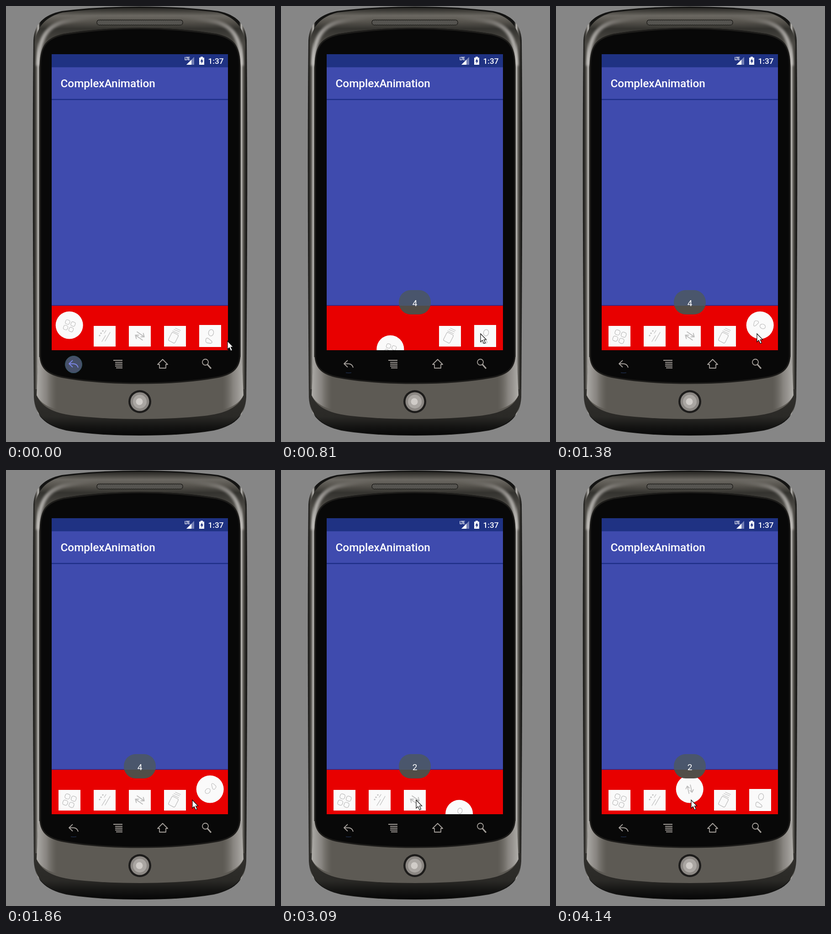
Write an HTML page that moves like this. It is 589x950 px and loops after 4170 ms.

```html
<!DOCTYPE html>
<html lang="en">
<head>
<meta charset="utf-8">
<title>Tab bar animation</title>
<style>
html, body { margin: 0; width: 100%; height: 100%; overflow: hidden; background: #868686; }
svg { display: block; width: 589px; height: 950px; }
text { font-family: Roboto, "Noto Sans", sans-serif; fill: #fff; }
.icon { fill: none; stroke: #bebebe; stroke-width: 1.3; stroke-linecap: round; stroke-linejoin: round; }
.nav { fill: none; stroke: #a39e99; stroke-width: 1.8; stroke-linejoin: round; }
</style>
</head>
<body>
<svg viewBox="0 0 589 950">
  <defs>
    <linearGradient id="side" gradientUnits="userSpaceOnUse" x1="58" x2="293" spreadMethod="reflect">
      <stop offset="0" stop-color="#121211"/><stop offset=".018" stop-color="#2b2a27"/>
      <stop offset=".034" stop-color="#55534e"/><stop offset=".046" stop-color="#8f8d89"/>
      <stop offset=".055" stop-color="#c4c2be"/><stop offset=".064" stop-color="#4a4945"/>
      <stop offset=".075" stop-color="#141413"/>
    </linearGradient>
    <linearGradient id="top" gradientUnits="userSpaceOnUse" x1="0" y1="4" x2="0" y2="118">
      <stop offset="0" stop-color="#262522"/><stop offset=".08" stop-color="#4a4843"/>
      <stop offset=".15" stop-color="#6b6862"/><stop offset=".27" stop-color="#55524c"/>
      <stop offset=".4" stop-color="#34332f"/><stop offset=".65" stop-color="#4a4843"/>
      <stop offset="1" stop-color="#4a4843" stop-opacity="0"/>
    </linearGradient>
    <linearGradient id="shine" gradientUnits="userSpaceOnUse" x1="66" x2="293" spreadMethod="reflect">
      <stop offset="0" stop-color="#c4c2be"/><stop offset=".12" stop-color="#a5a29e" stop-opacity=".85"/>
      <stop offset=".35" stop-color="#8a8782" stop-opacity=".35"/><stop offset=".6" stop-color="#77746e" stop-opacity="0"/>
    </linearGradient>
    <linearGradient id="corner" gradientUnits="userSpaceOnUse" x1="66" x2="293" spreadMethod="reflect">
      <stop offset="0" stop-color="#b0aeaa"/><stop offset=".1" stop-color="#928f8b" stop-opacity=".8"/>
      <stop offset=".2" stop-color="#77746e" stop-opacity="0"/>
    </linearGradient>
    <linearGradient id="base" x2="0" y2="1">
      <stop offset="0" stop-color="#32312e"/><stop offset=".6" stop-color="#2a2926"/>
      <stop offset=".82" stop-color="#141413"/><stop offset="1" stop-color="#070707"/>
    </linearGradient>
    <pattern id="mesh" width="4" height="4" patternUnits="userSpaceOnUse">
      <rect width="4" height="4" fill="#777570"/>
      <path d="M0 0h2v2h-2zM2 2h2v2h-2z" fill="#33322f"/>
    </pattern>
    <filter id="soft" x="-20%" y="-20%" width="140%" height="140%"><feGaussianBlur stdDeviation="2.5"/></filter>
    <clipPath id="screen"><rect x="100" y="105" width="386" height="645"/></clipPath>
    <clipPath id="above"><rect x="250" y="610" width="90" height="43"/></clipPath>
    <clipPath id="below"><rect x="250" y="653" width="90" height="30"/></clipPath>

    <g id="icon0" class="icon" transform="translate(0 1.5) rotate(20)">
      <rect x="-12.500" y="-12.500" width="10.500" height="10.500" rx="3.500"/><rect x="2" y="-12.500" width="10.500" height="10.500" rx="3.500"/>
      <rect x="-12.500" y="2" width="10.500" height="10.500" rx="3.500"/><rect x="2" y="2" width="10.500" height="10.500" rx="3.500"/>
    </g>
    <g id="icon1" class="icon">
      <path d="M-11 -1h.1M-8 -6h.1M-4 -11h.1" stroke-width="3.2"/>
      <path d="M-6 12L2 -1M1 11L12 -8M-1 -6L3 -12"/>
    </g>
    <g id="icon2" class="icon" transform="rotate(-55)">
      <path d="M-4 10V-9M-9 -3L-4 -9L0 -3M4 -10V9M9 3L4 9L0 3" stroke-width="2"/>
    </g>
    <g id="icon3" class="icon">
      <rect x="-8" y="-9" width="16" height="20" rx="3" transform="translate(-3 3) rotate(27)"/>
      <path d="M-5 -11L8 -5M-2 -14L10 -9M1 -17L12 -12"/>
    </g>
    <g id="icon4" class="icon">
      <ellipse cx="2" cy="-7" rx="5.600" ry="7" transform="rotate(12 2 -7)"/>
      <path d="M-9 6Q-6 3 -3 6L3 11Q6 15 1 16L-7 15Q-11 13 -9 6Z"/>
    </g>
  </defs>

  <path fill="url(#side)" d="M60 75C62 38 84 19 122 11Q200 1 293 1T465 11C503 19 525 38 527 75Q530 330 526 852C524 893 502 914 455 925Q390 936 293 936T132 925C85 914 63 893 61 852Q57 330 60 75Z"/>
  <path fill="url(#top)" d="M63 118V85C66 43 89 23 124 14Q200 4 293 4T463 14C498 23 521 43 524 85V118L512 128C509 80 493 68 462 61Q390 48 293 48T125 61C94 68 78 80 75 128Z"/>
  <path fill="none" stroke="url(#shine)" stroke-width="9" filter="url(#soft)" d="M71 130C72 78 83 47 125 35Q200 20 293 20T461 35C503 47 514 78 515 130"/>
  <path fill="url(#base)" d="M62 835H525V852C523 892 501 912 455 923Q390 935 293 935T132 923C85 912 64 892 62 852Z"/>
  <path id="chin" fill="#5d5a54" d="M71 765H516L520 848C508 877 477 888 435 893Q370 900 293 900T152 893C110 888 79 877 67 848Z"/>
  <path fill="url(#corner)" d="M71 765H516L520 848C508 873 477 882 435 887H152C110 882 79 873 67 848Z"/>
  <path fill="#080808" stroke="#1d1c1a" stroke-width="3" d="M75 128C76 85 91 70 126 62Q210 49 293 49T461 62C496 70 511 85 512 128V762C511 791 493 803 462 809Q390 822 293 822T125 809C94 803 76 791 75 762Z"/>
  <rect x="199" y="30.500" width="188" height="11" rx="5" fill="url(#mesh)" stroke="#22211e" stroke-width="1.500"/>
  <circle cx="293" cy="862" r="25" fill="#1d1c1b"/>
  <circle cx="293" cy="862" r="20.500" fill="#8b8783"/>
  <circle cx="293" cy="862" r="15" fill="#aaa6a2"/>
  <circle cx="292" cy="862" r="7.500" fill="#d0ccc8"/>

  <path d="M142 799Q148 800 154 799" stroke="#263a62" fill="none"/>
  <circle id="press" cx="148" cy="781" r="18.500" fill="#465069" stroke="#2e5560"/>
  <g class="nav">
    <path id="back" d="M146 772L138 779.500L146 787M138 779.500H148Q156 780 158 788"/>
    <path d="M235 772H255M239 776.500H255M239 780.500H255M239 784.500H255M241 788.500H255"/>
    <path d="M332 781L343 770L354 781H350V789H336V781Z"/>
    <circle cx="436.500" cy="776" r="6.500"/><path d="M441 781L449 790" stroke-width="3"/>
  </g>

  <g clip-path="url(#screen)">
    <rect x="100" y="105" width="386" height="645" fill="#3f4bae"/>
    <rect x="100" y="105" width="386" height="28.500" fill="#1f3283"/>
    <rect x="100" y="202.500" width="386" height="2.500" fill="#1f2f88"/>
    <text x="119.500" y="177" font-size="24.300" font-weight="500">ComplexAnimation</text>
    <text x="442.500" y="126" font-size="17.300" font-weight="500">1:37</text>
    <text x="391" y="118" font-size="8.500" font-weight="700" letter-spacing="-1">LTE</text>
    <path d="M395 128L412 111V128Z" fill="#7581b6"/><path d="M395 128L406 117V128Z" fill="#fff"/>
    <path d="M423 112.500H426V110.500H431V112.500H434V128H423Z" fill="#fff"/>
    <path d="M429.500 114L425.500 121H428V126L432 118.500H429.500Z" fill="#1f3283"/>
    <rect x="100" y="653" width="386" height="97" fill="#e80000"/>
    <path d="M100 652.500H486" stroke="#33247e" stroke-width="1.500"/>
    <g id="slots"></g>
    <g id="ball"><circle r="30" fill="#fafafa"/><use id="ballIcon"/></g>
    <g id="toast">
      <rect id="upper" x="258" y="619" width="70" height="53" rx="26" fill="#4a566c" clip-path="url(#above)"/>
      <rect x="258" y="619" width="70" height="53" rx="26" fill="#514e48" clip-path="url(#below)"/>
      <text id="label" x="293" y="654" font-size="19" text-anchor="middle"/>
    </g>
  </g>
  <path id="cursor" fill="#fff" stroke="#111" stroke-width="1.200" d="M0 0V18L4 14.300L7.200 21.500L10.500 20L7.300 13H12.500Z"/>
</svg>
<script>
const LOOP = 4170, TRAVEL = 884, SINK = 73.5, SPIN = 1470;
const $ = id => document.getElementById(id);
const clamp = v => Math.max(0, Math.min(1, v));
const ramp = (v, from, to) => clamp((v - from) / (to - from));
const smooth = u => u * u * (3 - 2 * u);
const slotX = i => 139 + 77 * i;

$('slots').innerHTML = [0, 1, 2, 3, 4].map(i =>
  `<g transform="translate(${slotX(i)} 719)"><rect x="-24" y="${i === 4 ? -24 : -22}" width="48"
   height="${i === 4 ? 48 : 45}" fill="#fafafa"/><use href="#icon${i}"/></g>`).join('');
const slots = [...$('slots').children];

const trips = [
  { start: 473, from: 0, to: 4 },
  { start: 2728, from: 4, to: 2 },
];

// Time, x and y of the pointer tip
const pointer = [[0, 485, 730], [380, 437, 714], [900, 437, 714], [1080, 440, 714],
  [1600, 440, 714], [1860, 408, 719], [2280, 296, 719], [LOOP, 296, 719]];

function pointerAt(time) {
  const i = pointer.findIndex(p => p[0] > time);
  const a = pointer[i - 1], b = pointer[i];
  const u = smooth(ramp(time, a[0], b[0]));
  return [a[1] + (b[1] - a[1]) * u, a[2] + (b[2] - a[2]) * u];
}

// Path parameter at which the ball passes below a slot
function passing(part) {
  return 0.5 - Math.sin(Math.asin(1 - 2 * part) / 3);
}

function slotOpacity(i, trip, t) {
  if (i === trip.from) return t > 0 ? ramp(t, 0.46, 0.58) : 0;
  if (i === trip.to) return 1 - ramp(t, 0.8, 0.93);
  const part = (i - trip.from) / (trip.to - trip.from);
  if (part < 0 || part > 1) return 1;
  const pass = passing(part);
  return Math.max(1 - ramp(t, pass - 0.29, pass - 0.14), ramp(t, pass + 0.08, pass + 0.17));
}

function draw(time) {
  const trip = time < trips[1].start ? trips[0] : trips[1];
  const age = time - trip.start;
  const t = clamp(age / TRAVEL);
  const x0 = slotX(trip.from), x1 = slotX(trip.to);
  const x = x0 + (x1 - x0) * smooth(t) - 0.3, y = 695.5 + 3 * SINK * t * (1 - t);
  const angle = 360 * ramp(age, 507, 507 + SPIN);

  $('ball').setAttribute('transform', `translate(${x} ${y})`);
  $('ballIcon').setAttribute('href', '#icon' + (t < 0.5 ? trip.from : trip.to));
  $('ballIcon').setAttribute('transform', `rotate(${angle}) scale(.88)`);
  slots.forEach((slot, i) => {
    const opacity = slotOpacity(i, trip, t);
    slot.setAttribute('opacity', opacity);
    slot.lastChild.setAttribute('opacity', ramp(opacity, 0.5, 1));
  });

  const shown = 1 - (1 - ramp(age, 10, 360)) ** 2;
  const leaving = trip === trips[0] ? 1 - ramp(time, 2440, 2728) : 1;
  $('toast').setAttribute('opacity', shown * leaving);
  $('upper').setAttribute('opacity', ramp(age, 100, 300));
  $('label').textContent = trip.to;

  const press = 1 - ramp(time, 60, 400);
  $('press').setAttribute('opacity', press);
  $('back').setAttribute('stroke', press > 0.4 ? '#7d86e8' : '#a39e99');
  $('cursor').setAttribute('transform', `translate(${pointerAt(time)})`);
}

const begin = performance.now();
function tick() {
  draw((performance.now() - begin) % LOOP);
  requestAnimationFrame(tick);
}
tick();
</script>
</body>
</html>
```
